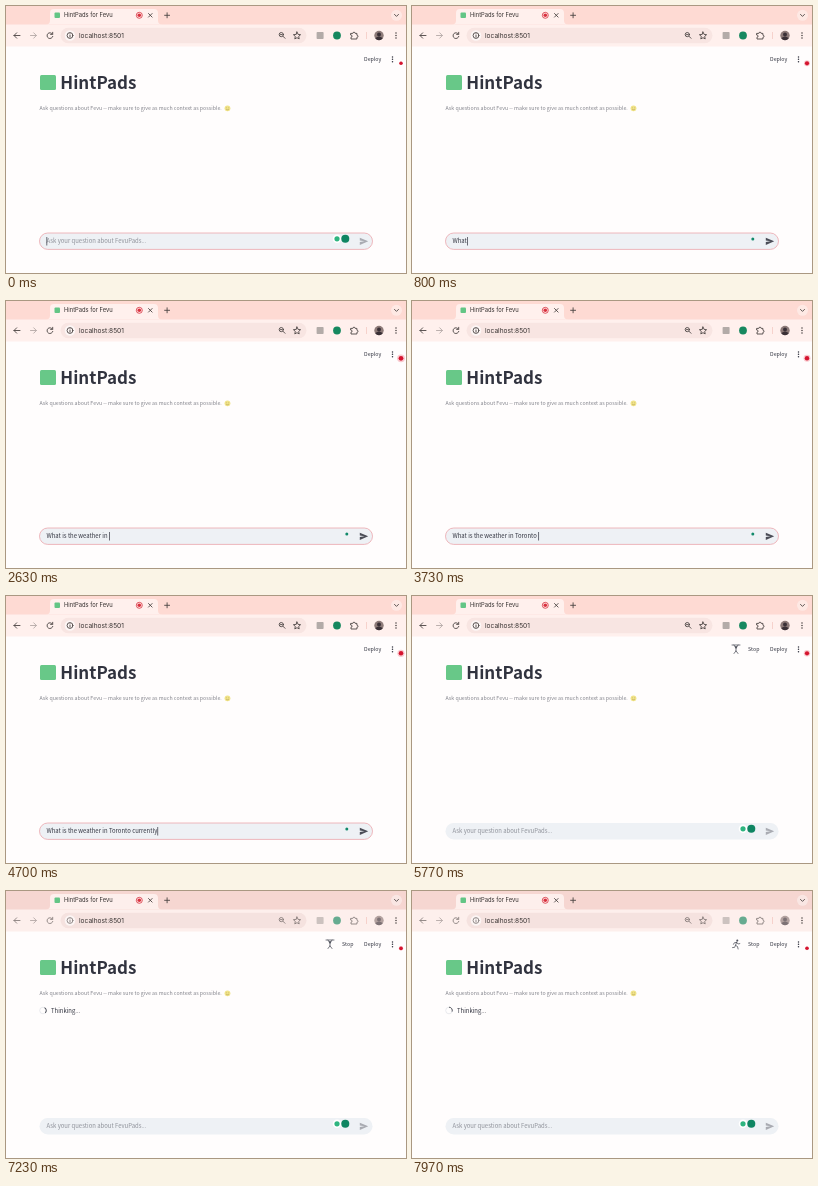
An HTML page for the animation above (8 s loop, 400x267 px).

```html
<!DOCTYPE html>
<html lang="en">
<head>
<meta charset="utf-8">
<title>HintPads</title>
<style>
  html, body { margin: 0; width: 100%; height: 100%; overflow: hidden; background: #fffdfd; }
  svg { display: block; width: 100vw; height: 100vh; }
  text { font-family: "Noto Sans CJK JP", "Noto Sans CJK SC", "Noto Sans CJK", "Open Sans", sans-serif; fill: #31333f; white-space: pre; }
  .ui { font-family: Inter, Roboto, sans-serif; fill: #35302f; }
  .line { fill: none; stroke: #4c4645; stroke-width: .9; stroke-linecap: round; stroke-linejoin: round; }
  .pale { stroke: #b5aaa8; }
  .man { fill: none; stroke: #4a4c57; stroke-width: .75; stroke-linecap: round; stroke-linejoin: round; }
</style>
</head>
<body>
<svg viewBox="0 0 400 267" preserveAspectRatio="none">
  <!-- browser window -->
  <rect id="strip" width="400" height="19"/>
  <rect id="bar" y="18.5" width="400" height="22"/>
  <path id="tab" d="M40 18.6q4 0 4-4V7q0-4 4-4h100q4 0 4 4v7.6q0 4 4 4z"/>
  <rect x="48.5" y="6.5" width="5.5" height="5.5" rx="1" fill="#63c585"/>
  <text class="ui" x="58" y="11.4" font-size="5.8">HintPads for Fevu</text>
  <circle cx="133.3" cy="9.3" r="3" fill="none" stroke="#d9303e" stroke-width=".8"/>
  <circle cx="133.3" cy="9.3" r="1.8" fill="#d9303e"/>
  <path class="line" d="M142.5 7.5l3.6 3.6m0-3.6l-3.6 3.6M158.6 9.3h5m-2.5-2.5v5"/>
  <circle cx="390.5" cy="9.3" r="5.5" fill="#fff" opacity=".4"/>
  <path class="line" d="M388.5 8.4l2 2 2-2"/>

  <rect id="pill" x="54.5" y="21.8" width="246" height="15.4" rx="7.7"/>
  <circle cx="64" cy="29.5" r="5.3" fill="#fff" opacity=".65"/>
  <path class="line pale" d="M24.5 29.5h5.8m-2.6-2.7l2.7 2.7-2.7 2.7"/>
  <g id="tools">
    <path class="line" d="M14 29.5H8m2.7-2.7L8 29.5l2.7 2.7"/>
    <path class="line" d="M46.4 28a2.9 2.9 0 1 0 .4 2.4M46.7 26.3V28.4h-2.1"/>
    <circle class="line" cx="64" cy="29.5" r="2.9"/>
    <path class="line" d="M64 29.4v1.6M64 27.9v.1"/>
    <circle class="line" cx="275.3" cy="28.6" r="2.1"/>
    <path class="line" d="M277 30.3l2 2M274.5 28.6h1.6"/>
    <path class="line" d="M291 26l1.1 2.4 2.5.3-1.9 1.7.5 2.5-2.2-1.2-2.2 1.2.5-2.5-1.9-1.7 2.5-.3z"/>
    <rect x="310.6" y="26" width="7" height="7" rx=".8" fill="#b3aba8"/>
    <circle cx="331" cy="29.5" r="3.9" fill="#16885f"/>
    <path class="line" d="M345 27.4h1.8a1.2 1.2 0 0 1 2.4 0h1.7v1.8a1.1 1.1 0 0 1 0 2.2v1.6h-5.9v-1.8a1.1 1.1 0 0 0 0-2.2z"/>
    <circle cx="373" cy="29.5" r="4.7" fill="#8d7a78"/>
    <path d="M369.2 32.3q3.8-3.4 7.6 0-1.4 1.9-3.8 1.9t-3.8-1.9z" fill="#3a3036"/>
    <circle cx="373" cy="28.4" r="2" fill="#3a3036"/>
  </g>
  <path d="M360.5 26v7" stroke="#f2c4bd" stroke-width=".7"/>
  <text class="ui" x="73" y="31.9" font-size="6.6">localhost:8501</text>
  <path class="line" d="M390 27v0m0 2.5v0m0 2.5v0" style="stroke-width:1.6"/>

  <!-- page -->
  <text x="358" y="55.1" font-size="5.3">Deploy</text>
  <path class="line" d="M386.5 50.9v0m0 2.4v0m0 2.4v0" style="stroke-width:1.5;stroke:#31333f"/>
  <circle id="halo" cx="395" cy="57.3" fill="#ef6b78" opacity=".35"/>
  <circle id="dot" cx="395" cy="57.3" fill="#d5142f"/>

  <g id="running">
    <path class="man" id="man"/>
    <circle id="head" r="1" fill="#4a4c57"/>
    <text x="336" y="55.1" font-size="5.3">Stop</text>
  </g>

  <rect x="34" y="69" width="16" height="15" rx="1.5" fill="#68c888"/>
  <text x="54.3" y="83" font-size="17" font-weight="700">HintPads</text>
  <text x="33.5" y="104.2" font-size="5.28" style="fill:#83848c">Ask questions about Fevu -- make sure to give as much context as possible.</text>
  <circle cx="221.5" cy="102.3" r="2.9" fill="#f0e388"/>
  <path d="M220.4 101.3v.5m2.2-.5v.5M220 103q1.5 1.5 3 0" fill="none" stroke="#a48a4c" stroke-width=".5"/>

  <g id="thinking">
    <circle cx="37" cy="119.5" r="3.3" fill="none" stroke="#e4e5e9" stroke-width=".8"/>
    <path id="spin" d="M37 116.2a3.3 3.3 0 0 1 3.1 4.4" fill="none" stroke="#44464f" stroke-width=".9"/>
    <text x="45" y="121.7" font-size="5.95">Thinking...</text>
  </g>

  <!-- question box -->
  <rect id="box" x="33.5" y="227" width="333" height="16.4" rx="8.2" fill="#eef1f5" stroke-width=".8"/>
  <text id="input" x="40.5" y="237.3" font-size="5.95"></text>
  <rect id="caret" y="231" width=".7" height="8.5" fill="#31333f"/>
  <g id="helpers">
    <circle cx="331" cy="232.8" r="4.3" fill="#fff"/>
    <circle cx="331" cy="232.8" r="2.6" fill="#2fb580"/>
    <circle cx="339.3" cy="232.8" r="4" fill="#0f8562"/>
  </g>
  <circle id="helper" cx="340.8" cy="233" r="1.5" fill="#128a6b"/>
  <path id="send" d="M353.8 231.7l8.4 3.6-8.4 3.6v-2.9l4.7-.7-4.7-.7z"/>
</svg>
<script>
const $ = id => document.getElementById(id);
const set = (id, attrs) => { for (const k in attrs) $(id).setAttribute(k, attrs[k]); };
const show = (id, on) => set(id, { visibility: on ? "visible" : "hidden" });

const CYCLE = 8000, SUBMIT = 5650, BLUR = 6250, THINK = 7100;
const question = "What is the weather in Toronto currently";
const hint = "Ask your question about FevuPads...";
const typing = [[380, 0], [1720, 14], [2620, 23], [3700, 31], [4680, 40]]; // [ms, letters]

// [head x, head y, body path] for lifting, swimming, cycling, running
const poses = [
  [324, 51, "M320 49h8M322 49l2 3.5 2-3.5M324 52.5v2.3l-2 2.7M324 54.8l2 2.7"],
  [326.5, 52, "M320.5 53.8l4-.8-1.5-2.7-2.5.3M320 55.5q1-1 2 0t2 0 2 0 2 0M320 57.3q1-1 2 0t2 0 2 0 2 0"],
  [325.5, 50, "M320 56a1.5 1.5 0 1 0 3 0 1.5 1.5 0 1 0-3 0M325.5 56a1.5 1.5 0 1 0 3 0 1.5 1.5 0 1 0-3 0M324.5 51.5l-2 1.5 1.8 1.3v2M324.5 51.5l2.5 1.3"],
  [325.3, 49.5, "M324.8 51l-1.3 3.3 2 1.2.6 2.5M323.5 54.3l-.8 2-2.2.3M324.6 51.3l-2.3.5-.8 1.5M324.6 51.3l1.5 1.7 1.7-.4"]
];

function letters(t) {
  let count = 0;
  for (let i = 1; i < typing.length; i++) {
    const [t0, n0] = typing[i - 1], [t1, n1] = typing[i];
    if (t >= t0) count = n0 + (n1 - n0) * Math.min(1, (t - t0) / (t1 - t0));
  }
  return Math.floor(count + 1e-6);
}

function draw(t) {
  const sent = t >= SUBMIT, active = t < BLUR;
  const n = sent ? 0 : letters(t);

  set("strip", { fill: active ? "#fedad3" : "#f6d6d1" });
  for (const id of ["bar", "tab"]) set(id, { fill: active ? "#fff0ed" : "#fdefec" });
  set("pill", { fill: active ? "#f8e5e2" : "#f5e2df" });
  set("tools", { opacity: active ? 1 : .65 });

  const pulse = (1 - Math.cos(2 * Math.PI * (t / 1000 - .07))) / 2;
  set("dot", { r: 1.7 + .7 * pulse });
  set("halo", { r: 1.7 + 2.3 * pulse });

  $("input").textContent = n ? question.slice(0, n) : hint;
  $("input").style.fill = n ? "#31333f" : "#8d9098";
  set("box", { stroke: sent ? "none" : "#eba6ac" });
  set("caret", { x: 40.5 + (n ? $("input").getComputedTextLength() + .2 : 0) });
  show("caret", !sent);
  show("helpers", !n);
  show("helper", n);
  set("send", { fill: n ? "#4b4d57" : "#a9abb2" });

  show("running", sent);
  const [x, y, d] = poses[Math.floor(t / 200) % poses.length];
  set("head", { cx: x, cy: y });
  set("man", { d });

  show("thinking", t >= THINK);
  set("spin", { transform: `rotate(${(t - 7970) * .45} 37 119.5)` });
}

function frame() {
  draw(performance.now() % CYCLE);
  requestAnimationFrame(frame);
}
frame();
</script>
</body>
</html>
```
